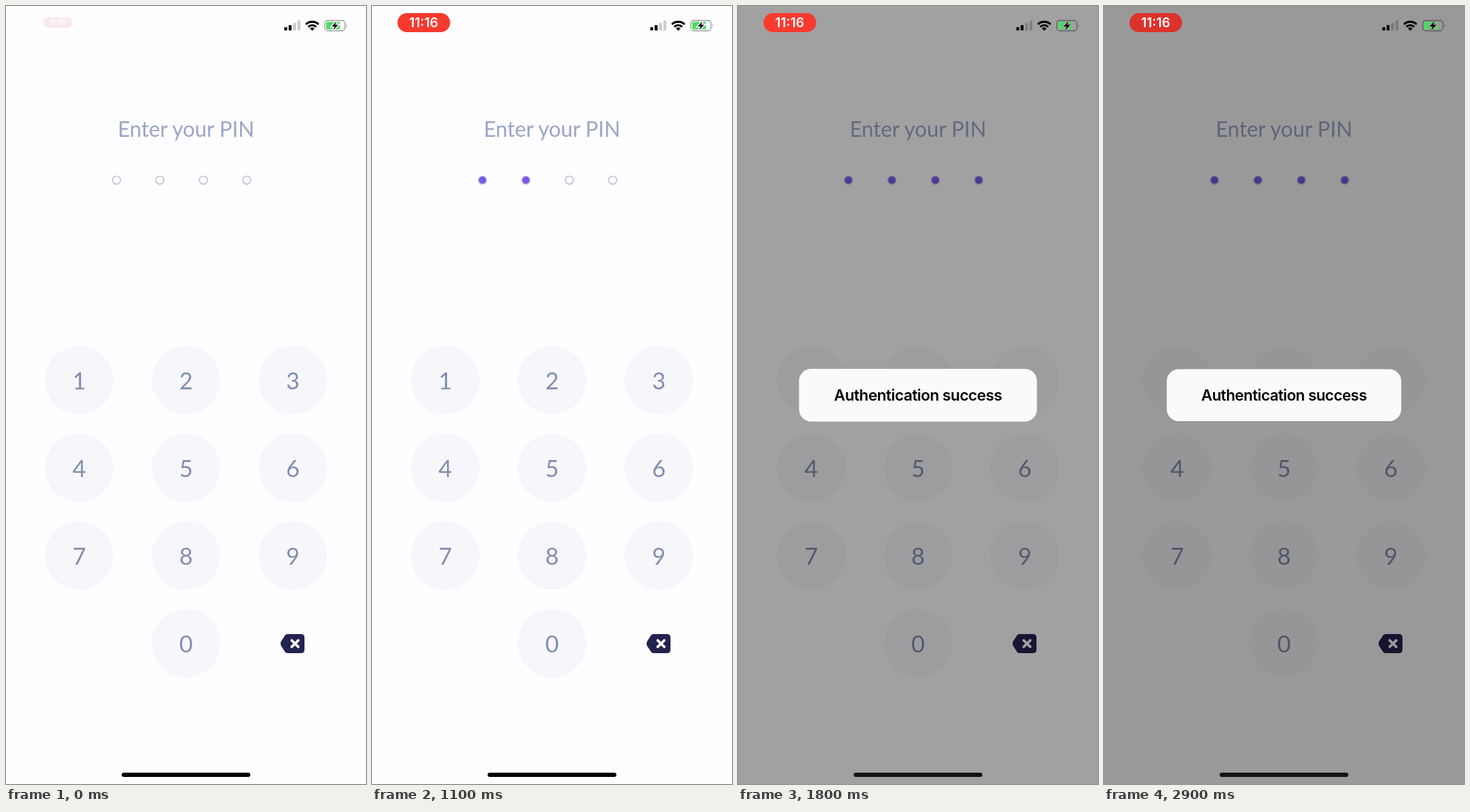
Write an HTML page that moves like this. It is 509 px wide and 1100 px high and loops after 3 s.

```html
<!DOCTYPE html>
<html lang="en">
<head>
<meta charset="utf-8">
<title>PIN entry</title>
<style>
  html, body { margin: 0; width: 100%; height: 100%; overflow: hidden; background: #fefdff; }
  svg { display: block; width: 100%; height: 100%; }
  text { text-anchor: middle; }
  .title { font: 30px Lato, sans-serif; fill: #9aa6c6; }
  .key circle { fill: #f7f6fa; }
  .key text { font: 33px Lato, sans-serif; fill: #7f8fb0; }
  .dot { stroke: #b7bac8; stroke-width: 1.3; }
  .clock { font: 600 18.5px Inter, sans-serif; fill: #fff; }
  .message { font: 600 21.5px Inter, sans-serif; letter-spacing: -.5px; }
</style>
</head>
<body>
<svg viewBox="0 0 509 1100">
  <defs>
    <path id="bolt" d="M467.3 21.5 460.5 29H464.7L462.8 34.2 469.7 26.6H465.4Z"/>
    <mask id="boltGap" maskUnits="userSpaceOnUse" x="445" y="15" width="45" height="25">
      <rect x="445" y="15" width="45" height="25" fill="#fff"/>
      <use href="#bolt" fill="#000" stroke="#000" stroke-width="3"/>
    </mask>
  </defs>

  <rect width="509" height="1100" fill="#fefdff"/>
  <text class="title" x="254.5" y="185">Enter your PIN</text>
  <g id="dots"></g>
  <g id="keys"></g>
  <path fill="#23234f" d="M398 888H417Q422 888 422 893V910Q422 915 417 915H398Q396 915 394.5 913.2L389.2 905Q387.200 901.5 389.2 898L394.500 889.800Q396 888 398 888Z"/>
  <path d="M404 897 413.200 906M413.200 897 404 906" stroke="#fefdff" stroke-width="3.8" stroke-linecap="round"/>

  <rect id="dim" width="509" height="1100"/>
  <rect id="home" x="163.500" y="1084" width="182" height="6" rx="3"/>

  <g id="status">
    <path d="M393.500 30h4v4.500h-4zM399.700 27h4v7.500h-4z"/>
    <path d="M406 24h4v10.500h-4zM412.200 20.500h4v14h-4z" opacity=".2"/>
    <path d="M433 35 429.700 31.700A4.700 4.700 0 0 1 436.300 31.700Z"/>
    <path d="M427.400 29.400A7.900 7.900 0 0 1 438.600 29.400M424 26A12.700 12.700 0 0 1 442 26" fill="none" stroke="#000" stroke-width="2.8"/>
    <g mask="url(#boltGap)">
      <rect x="450.700" y="20.500" width="28.600" height="14.500" rx="4" fill="none" stroke="#000" stroke-opacity=".4" stroke-width="1.300"/>
      <rect x="452.700" y="22.500" width="19.500" height="10.500" rx="2" fill="#4cd964"/>
    </g>
    <path d="M481 25.700Q483 27.700 481 29.700Z" opacity=".45"/>
    <use href="#bolt"/>
  </g>

  <g id="pill">
    <rect id="pillShape" x="36" y="10" width="74.500" height="27" rx="13.500"/>
    <text class="clock" x="73" y="30">11:16</text>
  </g>

  <g id="alert">
    <rect x="88.700" y="513.500" width="331.600" height="73.500" rx="17" fill="#faf9fc"/>
    <text class="message" x="254.500" y="558">Authentication success</text>
  </g>
</svg>
<script>
  const LOOP = 3000, STEP = 100, ALERT_AT = 1600;
  const $ = id => document.getElementById(id);

  $("dots").innerHTML = [0, 1, 2, 3]
    .map(i => `<circle class="dot" cx="${156.2 + 61.4 * i}" cy="246.300" r="5.700"/>`).join("");

  $("keys").innerHTML = [1, 2, 3, 4, 5, 6, 7, 8, 9, 0].map((digit, i) => {
    const slot = digit ? i : 10;
    const x = 103.5 + 151 * (slot % 3), y = 529 + 124 * Math.floor(slot / 3);
    return `<g class="key"><circle cx="${x}" cy="${y}" r="48.500"/><text x="${x}" y="${y + 13}">${digit}</text></g>`;
  }).join("");

  // Critically damped spring from 0 to 1.
  const spring = (ms, speed) => {
    const x = Math.max(0, ms) / 1000 * speed;
    return 1 - (1 + x) * Math.exp(-x);
  };
  const scaleAbout = (x, y, s) => `translate(${x} ${y}) scale(${s}) translate(${-x} ${-y})`;
  const mix = (a, b, p) => a + (b - a) * p;

  function draw(t) {
    const shown = spring(t + 25, 20);
    $("pill").setAttribute("transform", scaleAbout(73.2, 23.5, mix(0.5, 1, shown)));
    $("pill").setAttribute("opacity", shown);
    const pulse = 0.5 + 0.5 * Math.cos((t - 1500) / 2800 * 2 * Math.PI);
    $("pillShape").setAttribute("fill",
      `rgb(${mix(220, 255, pulse)}, ${mix(50, 59, pulse)}, ${mix(44, 48, pulse)})`);

    [...$("dots").children].forEach((dot, i) =>
      dot.setAttribute("fill", t >= 700 + 250 * i ? "#7a58f0" : "none"));

    const open = spring(t - ALERT_AT, 21.5);
    $("dim").setAttribute("opacity", 0.395 * open);
    $("home").setAttribute("opacity", 1 - 0.12 * open);
    $("alert").setAttribute("opacity", Math.min(1, open * 1.15));
    $("alert").setAttribute("transform", scaleAbout(254.5, 550.2, mix(1.2, 1, open)));
  }

  // The motion advances at ten pictures per second.
  function tick(now) {
    draw(Math.floor((now % LOOP) / STEP + 0.01) * STEP % LOOP);
    requestAnimationFrame(tick);
  }
  draw(0);
  requestAnimationFrame(tick);
</script>
</body>
</html>
```
